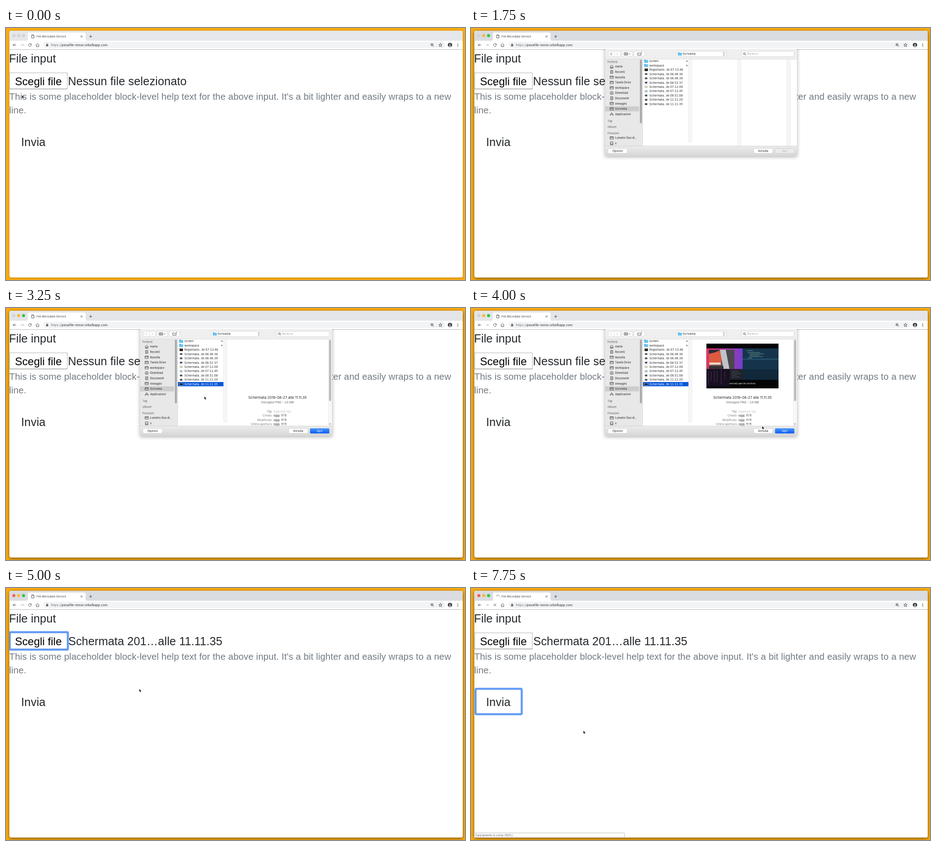
Animation of 1009x555 px, one loop 8 s. Source, as an HTML page:

```html
<!DOCTYPE html>
<html lang="it">
<head>
<meta charset="utf-8">
<title>File upload</title>
<style>
html, body { margin: 0; width: 100%; height: 100%; overflow: hidden; background: #f9ab13; }
svg { position: absolute; left: 0; top: 0; display: block; }
text { font-family: Inter, Roboto, sans-serif; white-space: pre; }
.page text { font: 25.2px "Liberation Sans", Arial, sans-serif; letter-spacing: .08px; fill: #24282c; }
.page .pick { font-size: 24px; letter-spacing: 0; fill: #000; }
.page .help { font-size: 20.2px; letter-spacing: .12px; fill: #727a82; }
.ui { font-size: 6.3px; fill: #262626; }
#files, .row { font-variant-numeric: tabular-nums; }
.side { font-size: 5.9px; fill: #3a3a3a; font-weight: 500; }
.side .head { fill: #707070; }
.mid { text-anchor: middle; }
.end { text-anchor: end; }
.line { fill: none; stroke: #4b4f54; stroke-width: 1; }
.ring { fill: none; stroke: #5c97f6; stroke-width: 3.6; filter: drop-shadow(0 0 1.2px #6ea6ff); }

.a { animation: 8s step-end infinite; }
.active { animation-name: active; }
.strip { animation-name: strip; }
.red { animation-name: red; }
.ring1 { animation-name: ring1; }
.ring2 { animation-name: ring2; }
.before { animation-name: before; }
.after { animation-name: after; }
.sheet { animation-name: sheet; }
.unpicked { animation-name: unpicked; }
.picked { animation-name: picked; }
.preview { animation-name: preview; }
.idle { animation-name: idle; }
.busy { animation-name: busy; }
.cursor { animation-name: cursor; }
.spin { animation: spin 1s steps(4, end) infinite; }

@keyframes active { 0% { opacity: 0 } 6.25%, 100% { opacity: 1 } }
@keyframes strip { 0% { fill: #e5e7ea } 6.25% { fill: #d9dce1 } 31.25% { fill: #e3e5e9 } 62.5%, 100% { fill: #d9dce1 } }
@keyframes red { 0% { opacity: 0 } 6.25% { opacity: 1 } 18.75% { opacity: 0 } 62.5%, 100% { opacity: 1 } }
@keyframes ring1 { 0% { opacity: 0 } 15.625% { opacity: 1 } 18.75% { opacity: 0 } 62.5% { opacity: 1 } 71.875%, 100% { opacity: 0 } }
@keyframes ring2 { 0% { opacity: 0 } 71.875%, 100% { opacity: 1 } }
@keyframes before { 0% { opacity: 1 } 62.5%, 100% { opacity: 0 } }
@keyframes after { 0% { opacity: 0 } 62.5%, 100% { opacity: 1 } }
@keyframes sheet {
  0% { transform: translateY(-260px) }
  18.75% { transform: translateY(-120px) }
  21.875% { transform: none }
  56.25% { transform: translateY(-12px) }
  59.375%, 100% { transform: translateY(-260px) }
}
@keyframes unpicked { 0% { opacity: 1 } 37.5%, 100% { opacity: 0 } }
@keyframes picked { 0% { opacity: 0 } 37.5%, 100% { opacity: 1 } }
@keyframes preview { 0% { opacity: 0 } 43.75%, 100% { opacity: 1 } }
@keyframes idle { 0% { opacity: 1 } 78.125%, 100% { opacity: 0 } }
@keyframes busy { 0% { opacity: 0 } 78.125%, 100% { opacity: 1 } }
@keyframes spin { to { transform: rotate(-360deg) } }
@keyframes cursor {
  0% { transform: translate(35px, 148px) }
  3.125% { transform: translate(47px, 127px) }
  6.25% { transform: translate(51px, 121px) }
  31.25% { transform: translate(130px, 133px) }
  34.375% { transform: translate(310px, 158px) }
  37.5% { transform: translate(428px, 168px) }
  40.625% { transform: translate(436px, 194.5px) }
  46.875% { transform: translate(520px, 222px) }
  50% { transform: translate(640px, 260px) }
  53.125% { transform: translate(678px, 270px) }
  56.25% { transform: translate(675px, 270px) }
  59.375% { transform: translate(520px, 255px) }
  62.5% { transform: translate(293px, 222px) }
  65.625% { transform: translate(165px, 236px) }
  68.75% { transform: translate(70px, 250px) }
  81.25% { transform: translate(95px, 260px) }
  84.375% { transform: translate(160px, 284px) }
  87.5% { transform: translate(225px, 307px) }
  90.625%, 100% { transform: translate(247px, 314px) }
}

@property --p { syntax: "<integer>"; inherits: true; initial-value: 0; }
#status {
  position: absolute; left: 7px; top: 539px; width: 331px; height: 10.5px; box-sizing: border-box;
  border: 1px solid #b9bbbd; border-left-color: #ddd; background: #fff; border-radius: 0 2px 0 0;
  font: 6.2px/9px Inter, Roboto, sans-serif; color: #5a5d61; padding-left: 1px;
  animation: busy 8s step-end infinite, load 8s step-end infinite;
}
#status::after { counter-reset: p var(--p); content: "Caricamento in corso (" counter(p) "%)..."; }
@keyframes load {
  0% { --p: 0 } 78.125% { --p: 4 } 81.25% { --p: 12 } 84.375% { --p: 20 } 87.5% { --p: 28 }
  90.625% { --p: 36 } 93.75% { --p: 43 } 96.875%, 100% { --p: 50 }
}
</style>
</head>
<body>
<svg width="1009" height="555" viewBox="0 0 1009 555">
  <defs>
    <clipPath id="win"><rect x="7.5" y="6" width="996.5" height="543.5" rx="4"/></clipPath>
    <clipPath id="below"><rect x="270" y="46.5" width="480" height="270"/></clipPath>
    <linearGradient id="foot" x2="0" y2="1"><stop stop-color="#ececec"/><stop offset="1" stop-color="#d6d6d6"/></linearGradient>
    <linearGradient id="blue" x2="0" y2="1"><stop stop-color="#4a98fb"/><stop offset="1" stop-color="#0d5cf5"/></linearGradient>
    <linearGradient id="pink"><stop stop-color="#ec2e62"/><stop offset="1" stop-color="#7240cf"/></linearGradient>
    <g id="folder"><path fill="#3fa9e4" d="M-4.3-3.2h3l1 1h4.6v5.6h-8.6z"/><path fill="#6cc6f5" d="M-4.3-1.2h8.6v4.6h-8.6z"/></g>
  </defs>

  <rect x="7.5" y="6" width="996.5" height="543.5" rx="4" fill="#fff" style="filter:drop-shadow(0 1px 2px #7a500077)"/>
  <rect class="a active" x="7.5" y="6" width="996.5" height="543.5" rx="4" fill="#fff" style="filter:drop-shadow(0 3px 4px #5a380090)"/>

  <g clip-path="url(#win)">
    <rect class="a strip" x="7" y="6" width="998" height="22"/>
    <g fill="#d3d5d8" stroke="#bfc1c4" stroke-width=".5">
      <circle cx="17.2" cy="16.8" r="3.1"/><circle cx="28" cy="16.8" r="3.1"/><circle cx="38.6" cy="16.8" r="3.1"/>
    </g>
    <circle class="a red" cx="17.2" cy="16.8" r="3.3" fill="#fc5b54"/>
    <g class="a active"><circle cx="28" cy="16.8" r="3.3" fill="#fbbb2d"/><circle cx="38.6" cy="16.8" r="3.3" fill="#2ac63f"/></g>

    <path fill="#fff" d="M45 28q3 0 3-3V13.500q0-3.500 3.500-3.500h120q3.500 0 3.500 3.500V25q0 3 3 3z"/>
    <path class="line a idle" stroke-width=".9" d="M56.500 15h3.200l2 2v5h-5.200zM59.500 15v2.200h2.200"/>
    <g transform="translate(59 18.800)"><g class="a busy"><path class="spin" fill="none" stroke="#6f7378" stroke-width=".9" d="M0 3.300A3.300 3.300 0 0 1 0-3.300"/></g></g>
    <text x="67" y="21" font-size="6.2" fill="#45484c">File Microdata Service</text>
    <path class="line" d="M164.200 16.700l4 4m0-4l-4 4M183 18.700h6.200m-3.100-3.100v6.200"/>

    <rect x="82" y="30.500" width="883" height="13.500" rx="6.700" fill="#f1f3f4"/>
    <path class="line" stroke-width="1.1" d="M22.300 37.400h-6.600m3-3l-3 3 3 3"/>
    <path class="line" style="stroke:#b9bcc0" d="M32 37.400h6.600m-3-3l3 3-3 3"/>
    <g class="a idle"><path class="line" d="M55.200 35.700a3.100 3.100 0 1 0 .5 2.400"/><path fill="#4b4f54" d="M56.200 34v3h-3z"/></g>
    <path class="line a busy" d="M49.900 34.700l5.400 5.400m0-5.400l-5.400 5.400"/>
    <path class="line" d="M65.500 38l3.800-3.900 3.800 3.900m-6.400-.8v3.900h5.200v-3.900"/>
    <rect x="88.300" y="36.600" width="4.300" height="3.700" rx=".5" fill="#55595e"/>
    <path class="line" stroke-width=".8" d="M89.200 36.800v-1.100a1.200 1.200 0 0 1 2.500 0v1.100"/>
    <text x="98.500" y="39.700" font-size="7.1" fill="#27292c"><tspan fill="#70757a">https://</tspan>pesafile-minor.orbelkapp.com</text>
    <path class="line" d="M938.200 38.600l2.300 2.400"/><circle class="line" cx="936.400" cy="36.700" r="2.500"/>
    <path class="line" stroke-width=".7" d="M935.200 36.700h2.400m-1.200-1.200v2.400"/>
    <path class="line" stroke-width=".8" d="M955 33.800l1 2.500 2.700.2-2 1.800.6 2.600-2.300-1.400-2.300 1.400.6-2.600-2-1.800 2.700-.2z"/>
    <circle cx="976" cy="37.500" r="4.800" fill="#32343a"/><path fill="#a2a2a5" d="M972.500 40.700q1-3 3.500-3t3.500 3a4.800 4.800 0 0 1-7 0z"/><circle cx="976" cy="36.300" r="1.700" fill="#a2a2a5"/>
    <g fill="#4b4f54"><circle cx="993" cy="34.800" r=".9"/><circle cx="993" cy="37.500" r=".9"/><circle cx="993" cy="40.200" r=".9"/></g>
    <rect x="7" y="47" width="998" height="1" fill="#b5b8bb"/>

    <g class="page">
      <text x="6.800" y="76">File input</text>
      <rect x="8.200" y="98.700" width="126.500" height="35.600" fill="#fff" stroke="#c3c3c3" stroke-width="1.300"/>
      <path d="M8 134.400h127" stroke="#9b9b9b" stroke-width="1.200"/>
      <rect class="ring a ring1" x="8.300" y="97.300" width="127.700" height="38.400" rx="1.500"/>
      <text class="pick" x="19.800" y="125.500">Scegli file</text>
      <text class="a before" x="136.300" y="125.500">Nessun file selezionato</text>
      <text class="a after" x="137" y="125.500">Schermata 201…alle 11.11.35</text>
      <text class="help" x="7.300" y="158.300">This is some placeholder block-level help text for the above input. It's a bit lighter and easily wraps to a new</text>
      <text class="help" x="7" y="188.300">line.</text>
      <rect class="ring a ring2" x="10" y="222" width="101.500" height="56" rx="2"/>
      <text x="33.300" y="260.300">Invia</text>
    </g>
  </g>

  <g clip-path="url(#below)">
    <g class="a sheet">
      <rect x="295" y="40" width="421.500" height="241.500" fill="#f0f0f0" style="filter:drop-shadow(0 2px 4px #0005)"/>
      <rect x="295" y="40" width="421.500" height="28.500" fill="#efefef"/>
      <rect x="295" y="68.500" width="82.500" height="191.500" fill="#e8e8e8"/>
      <rect x="377.500" y="68.500" width="339" height="191.500" fill="#fff"/>
      <path d="M295 68.500h421.500M377.500 68.500v191.500" stroke="#d2d2d2" stroke-width=".7"/>

      <g fill="#fff" stroke="#cfcfcf" stroke-width=".7">
        <rect x="302" y="51.300" width="26.500" height="11.500" rx="2"/><path d="M315.200 51.300v11.500"/>
        <rect x="332" y="51.300" width="23" height="11.500" rx="2"/><rect x="358.500" y="51.300" width="23.500" height="11.500" rx="2"/>
        <rect x="451.500" y="51.300" width="109" height="11.500" rx="2"/><rect x="595.500" y="51.300" width="115" height="11.500" rx="2"/>
      </g>
      <path class="line" style="stroke:#bcbcbc" d="M309.500 54.300l-2.600 2.800 2.600 2.800m10.900-5.600l2.600 2.800-2.600 2.800"/>
      <path class="line a unpicked" d="M309.500 54.300l-2.600 2.800 2.600 2.800"/>
      <path class="line" stroke-width=".8" d="M336.500 54.700h8v4.800h-8zm2.700 0v4.800m2.700-4.800v4.800m5.600-3.200l1.500 1.600 1.500-1.600M366.500 55h3l1 1h3.500v4h-7.500zm7-1h2m-1-1v2M554 55.900l1.900-2 1.900 2m-3.800 2.400l1.900 2 1.900-2"/>
      <use href="#folder" x="459" y="57"/>
      <text class="ui" x="465" y="59.300" style="font-size:6.500px">Scrivania</text>
      <circle class="line" cx="601" cy="56.500" r="2.100" stroke-width=".7"/><path class="line" stroke-width=".8" d="M602.600 58.200l2 2"/>
      <text class="ui" x="607" y="59.300" style="font-size:6.500px;fill:#a3a3a3">Ricerca</text>

      <rect x="295" y="172.600" width="74.500" height="11" fill="#cdcdcd"/>
      <g id="side" class="side"></g>
      <rect x="371.300" y="69.500" width="4.400" height="140.500" rx="2.200" fill="#a9a9a9"/>

      <g id="files" class="ui"></g>
      <g fill="#f6f6f6" stroke="#e4e4e4" stroke-width=".6">
        <rect x="478" y="69" width="7.500" height="182"/>
        <g class="a unpicked"><rect x="586" y="69" width="7.500" height="191"/><rect x="694" y="69" width="7.500" height="191"/></g>
      </g>

      <g class="a picked">
        <rect x="378" y="163" width="100" height="9.400" fill="#0a58d8"/>
        <rect x="381.500" y="165.300" width="7.500" height="5" fill="#182438" stroke="#dfe7f5" stroke-width=".5"/>
        <text class="ui row" x="392" y="170" style="fill:#fff">Schermata...lle 11.11.35</text>
        <rect x="708.500" y="69" width="8" height="191" fill="#f8f8f8" stroke="#e4e4e4" stroke-width=".6"/>
        <rect x="710.200" y="70" width="4.400" height="135" rx="2.200" fill="#b8b8b8"/>
        <path class="line" stroke-width=".5" d="M711 253.500v4m2 -4v4" style="stroke:#999"/>
        <g class="ui">
          <text class="mid" x="596.800" y="199.900" style="font-size:7.800px">Schermata 2018-08-27 alle 11.11.35</text>
          <text class="mid" x="596.800" y="210.300" style="fill:#7d7d7d;font-weight:500">Immagine PNG - 3,6 MB</text>
          <g id="info"></g>
        </g>
      </g>

      <g class="a preview">
        <rect x="517.500" y="78.500" width="158.500" height="98.500" fill="#050508"/>
        <rect x="518" y="89" width="79" height="45.500" fill="url(#pink)"/>
        <rect x="523" y="92" width="56" height="42" fill="#6b4f4c"/>
        <path fill="#dc5a40" d="M523 100l22-6 8 12-4 16-26 4z"/>
        <path fill="#2b2c35" d="M523 92h24l-8 5-16 4z"/>
        <path fill="#4a4750" d="M560 92h19v42h-12z"/><path fill="#c2c3c8" d="M547 92l13 0 8 42h-13z"/>
        <path fill="#ead3c4" d="M524 120h25v5h-25z"/><path fill="#353239" d="M523 128h32v6h-32z"/>
        <rect x="597" y="89" width="79" height="46" fill="#15344c"/>
        <path d="M606 94h14m-12 4h28m-24 3h32m-32 3h22m-22 3h30m-34 3h10" stroke="#7fb59d" stroke-width=".8"/>
        <rect x="597" y="111.500" width="79" height="2.500" fill="#25506b"/>
        <rect x="518" y="134.500" width="51" height="38" fill="#171020"/>
        <path d="M522 139v29m6-28v20m7-22v26m6-24v22m9-25v32m8-28v18" stroke="#71447f" stroke-width="1.200" stroke-dasharray="2 1.500"/>
        <rect x="569" y="135" width="28" height="23" fill="#20232b"/>
        <path d="M573 140h14m-14 4h20m-20 4h11m-11 4h17" stroke="#686e7c" stroke-width=".7"/>
        <rect x="597" y="135" width="79" height="23" fill="#11283b"/>
        <text class="mid" x="597" y="167.800" font-size="4.300" fill="#fff">vertically span the row three.</text>
      </g>

      <rect x="295" y="260" width="421.500" height="21.500" fill="url(#foot)"/>
      <path d="M295 260h421.500" stroke="#c4c4c4" stroke-width=".7"/>
      <g fill="#fff" stroke="#c2c2c2" stroke-width=".6">
        <rect x="301" y="265.300" width="42.500" height="10.700" rx="2"/><rect x="621.500" y="265.300" width="42" height="10.700" rx="2"/>
        <rect x="668.500" y="265.300" width="42" height="10.700" rx="2" fill="#ececec"/>
      </g>
      <g class="ui mid">
        <text x="322.200" y="272.900">Opzioni</text><text x="642.200" y="272.900">Annulla</text>
        <text x="689.300" y="272.900" style="fill:#b5b5b5">Apri</text>
        <g class="a picked"><rect x="668.300" y="265" width="42.500" height="11.200" rx="2" fill="url(#blue)"/><text x="689.300" y="272.900" style="fill:#fff">Apri</text></g>
      </g>
    </g>
  </g>
</svg>

<div id="status"></div>

<svg width="1009" height="555" viewBox="0 0 1009 555">
  <path class="a cursor" fill="#000" stroke="#fff" stroke-width=".5" d="M0 0v7l1.600-1.400 1.100 2.500 1.200-.5-1.100-2.400h2.100z"/>
</svg>

<script>
const fill = (id, parts) => { document.getElementById(id).innerHTML = parts.join(''); };

const shapes = {
  home: 'M-4 .3l4-3.800 4 3.800M-2.800-.5v4h5.600v-4M-.7 3.500v-2.500h1.400v2.500',
  page: 'M-2.500-3.300h5v6.600h-5zM-1.200-1h2.400M-1.200 1h2.400',
  box: 'M-3.600-2.600h7.200v5.200h-7.200zM-3.600-1h7.200',
  down: 'M-3.400 0a3.400 3.400 0 1 0 6.800 0a3.400 3.400 0 1 0-6.800 0M0-1.800v3.300M-1.300.4l1.300 1.300 1.300-1.300',
  tools: 'M-3.500 3.200l3.500-6.400 3.500 6.400M-4 1.200h8',
  disk: 'M-2.800-3.300h5.600v6.600h-5.600zM-2.800 1.300h5.600'
};
const item = ([name, icon], y) =>
  `<path class="line" stroke-width=".8" transform="translate(309.300 ${y})" d="${shapes[icon]}"/><text x="316.800" y="${y + 2.100}">${name}</text>`;
const places = [['marta', 'home'], ['Recenti', 'page'], ['Nuvolta', 'box'], ['Tavelo Drive', 'box'], ['workspace', 'box'],
  ['Download', 'down'], ['Documenti', 'page'], ['Immagini', 'box'], ['Scrivania', 'box'], ['Applicazioni', 'tools']];
const heads = [['Preferiti', 75], ['Tag', 205], ['oNuvel', 218], ['Posizioni', 232]];
fill('side', [
  ...heads.map(([name, y]) => `<text class="head" x="300" y="${y + 2.200}">${name}</text>`),
  ...places.map((p, i) => item(p, 85.200 + i * 11.600)),
  item(['Lumetro Due di...', 'box'], 242), item(['x', 'disk'], 254)
]);

const shots = ['06.48.36', '06.48.39', '06.52.37', '07.12.09', '07.12.45', '08.51.08', '11.11.20', '11.11.35'];
const tints = ['#34384f', '#34384f', '#34384f', '#d9c38d', '#7cbfc3', '#34384f', '#263040', '#182438'];
const files = ['screen', 'workspace', 'Registrazio...lle 07.13.46', ...shots.map(s => 'Schermata...lle ' + s)];
fill('files', files.map((name, i) => {
  const y = 73 + i * 9.460;
  const icon = i < 2
    ? `<use href="#folder" x="385" y="${y}"/><path fill="#777" d="M473.500 ${y - 2}l3.500 2-3.500 2z"/>`
    : i === 2
      ? `<rect x="381.500" y="${y - 3}" width="7.500" height="6" fill="#222"/><path d="M382 ${y - 2}h6.500" stroke="#b98d45"/>`
      : `<rect x="382" y="${y - 2.300}" width="6.500" height="4.600" fill="#e6e6e6" stroke="#bbb" stroke-width=".4"/><rect x="382.600" y="${y - 1.500}" width="4.600" height="3" fill="${tints[i - 3]}"/>`;
  return `${icon}<text x="392" y="${y + 2.200}">${name}</text>`;
}));

const info = [['Tag', 'Aggiungi tag...'], ['Creato', 'oggi, 11:11'], ['Modificato', 'oggi, 11:11'], ['Ultima apertura', 'oggi, 11:11']];
fill('info', info.map(([key, value], i) => {
  const y = 230 + i * 9.450;
  return `<text class="end" x="584" y="${y}" style="fill:#7d7d7d">${key}</text><text x="588" y="${y}" style="fill:${i ? '#262626' : '#c0c0c0'}">${value}</text>`;
}));
</script>
</body>
</html>
```
